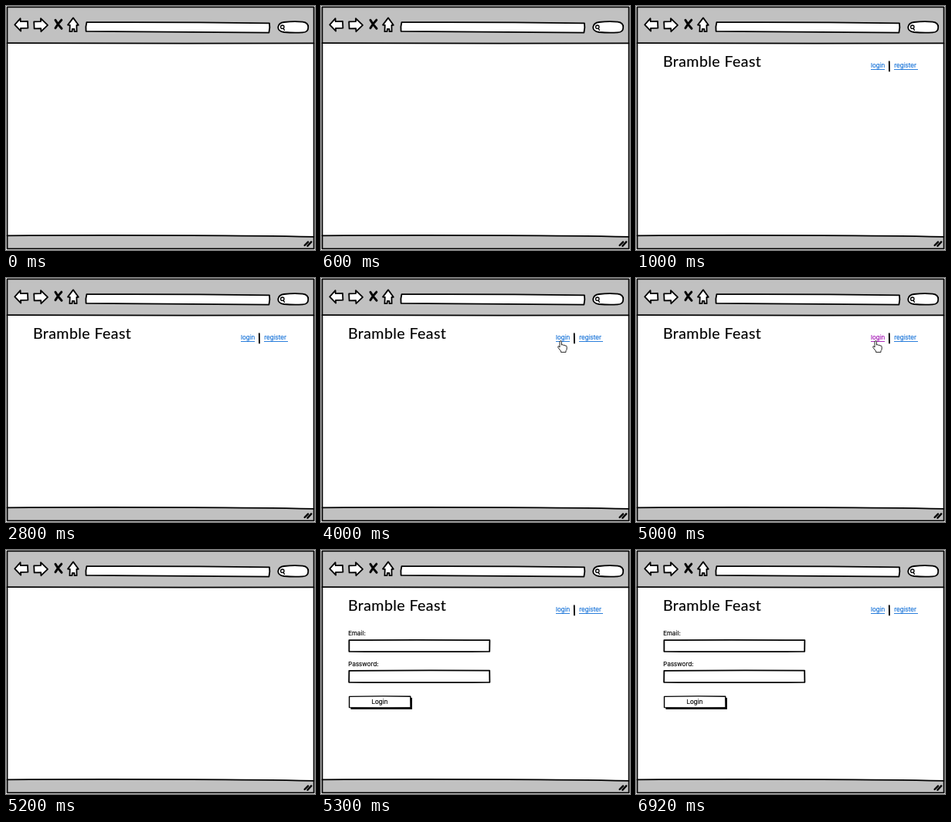
Write an HTML page that moves like this. It is 400 by 317 pixels and loops after 8000 ms.

```html
<!DOCTYPE html>
<html lang="en">
<head>
<meta charset="utf-8">
<title>Login wireframe</title>
<style>
  html, body { margin: 0; width: 100%; height: 100%; overflow: hidden; background: #fff; }
  svg { display: block; width: 400px; height: 317px; }
  text { font: 8px Inter, "Open Sans", sans-serif; stroke: #000; stroke-width: .15; }
  .ink { fill: #fff; stroke: #000; stroke-width: 1.8; stroke-linejoin: round; stroke-linecap: round; }
  .line { fill: none; }
  .bar { fill: #c1c1c1; }
  .title { font: 19.6px Lato, "Open Sans", sans-serif; letter-spacing: .4px; }
  .link, .link text { fill: #1672d8; stroke: #1672d8; }
  .link path { stroke-width: .9; }
  .visited, .visited text { fill: #a315b4; stroke: #a315b4; }
  [hidden] { display: none; }
</style>
</head>
<body>
<svg viewBox="0 0 400 317">
  <rect width="400" height="317" fill="#fff"/>

  <!-- browser window -->
  <path class="bar" d="M1 1.5 399 1V48.4L200 48.6 1 48.2Z"/>
  <path class="bar" d="M1 298.3Q100 297.6 240 298.1Q330 298.5 399 299.8V315.6H1Z"/>
  <path class="ink line" d="M1.5 1.4Q200 .8 398.6 1.3Q399 160 398.6 315.4Q200 315.8 1.6 315.4Q1 200 1.5 1.4Z"/>
  <path class="ink line" d="M1.5 48.2Q200 48.9 398.5 48.4M1.5 298.3Q100 297.6 240 298.1Q330 298.5 398.5 299.8"/>

  <!-- toolbar -->
  <path class="ink" d="M11.3 24.4 18.6 16.2 18.8 20.2 28 19.8 28.4 28.6 19 28.8 19.2 32.6Z"/>
  <path class="ink" d="M36.2 20.4 45 20.2 45 16.2 54 24.8 45.4 33.2 45.2 29.2 36.6 29.4Z"/>
  <path class="ink line" d="M64 18.4Q67 24 72 29.2M71.8 18.2Q67 23 64 28.6" style="stroke-width:3"/>
  <path class="ink" d="M87 15.4 80 24.6 82.8 25 82.4 33.2 85.6 33 85.8 29.8 88.4 29.8 88.6 33.2 91.6 33.2 91.4 25 93.8 24.8Z"/>
  <path class="ink" d="M104.4 21.2Q220 20.6 341 22.4Q342 28 340.4 34.6Q220 33.4 103.6 32.8Q102.8 27 104.4 21.2Z"/>
  <path class="ink" d="M360 21Q372 19.6 384 20.6Q391.4 21.4 391.2 27.6Q391.4 34 384 34.4Q372 35.2 360 34Q352 33 352.2 27.4Q353 21.8 360 21Z"/>
  <g class="ink line" style="stroke-width:1.3">
    <circle cx="357.8" cy="27.2" r="2.2"/>
    <path d="M359 29.2 360.4 31.4"/>
  </g>
  <path class="ink line" d="M386.6 311 391 306.6M390.4 311.8 395.2 306.4" style="stroke-width:2.4"/>

  <g id="header" hidden>
    <text class="title" x="35" y="79.3">Bramble Feast</text>
    <g class="link" id="login">
      <text x="304" y="80.4">login</text>
      <path d="M304 82.5H322"/>
    </g>
    <path class="ink line" d="M327.8 72.2 328 84.6"/>
    <g class="link">
      <text x="334.2" y="80.4">register</text>
      <path d="M334 82.5H365"/>
    </g>
  </g>

  <g id="form" hidden>
    <text x="35.3" y="110.6">Email:</text>
    <path class="ink" d="M36.4 117.2Q120 116.4 218.4 117.2L218.2 131.8Q120 132.4 36.4 131.8Z"/>
    <text x="35.3" y="150.6">Password:</text>
    <path class="ink" d="M36.4 156.8Q130 156 218.2 156.6L218.4 171.8Q120 172.6 36.2 171.8Z"/>
    <path d="M38.5 192H118V207H38.5Z"/>
    <path class="ink" d="M36.6 190.4Q76 189.4 115.8 190.2L116 204.6Q76 205.2 36.6 204.6Z" style="stroke-width:1.4"/>
    <text x="76" y="200.4" text-anchor="middle">Login</text>
  </g>

  <path id="hand" hidden fill="#fff" stroke="#111" stroke-width=".9" stroke-linejoin="round"
    d="M309 90V83.2Q309 81.6 310.2 81.6T311.4 83.2V87Q313.2 85.8 313.8 87.4Q315.4 86.4 316 88Q318 87.4 318.2 89.4V92Q318 93.8 317 94.6V96.4H310.6V95Q308.8 93.2 307 90.4Q306.2 89 307.2 88.6Q308.2 88.6 309 90Z"/>
</svg>
<script>
  const LOOP = 8000;
  // start time, parts on show
  const steps = [
    [0, ""],
    [1000, "header"],
    [4000, "header hand"],
    [5000, "header hand visited"],
    [5200, ""],
    [5300, "header form"]
  ];
  const parts = ["header", "form", "hand"].map(id => document.getElementById(id));
  const login = document.getElementById("login");

  function draw() {
    const time = performance.now() % LOOP;
    const shown = steps.findLast(([start]) => start <= time)[1].split(" ");
    for (const part of parts) part.toggleAttribute("hidden", !shown.includes(part.id));
    login.classList.toggle("visited", shown.includes("visited"));
    requestAnimationFrame(draw);
  }
  draw();
</script>
</body>
</html>
```
